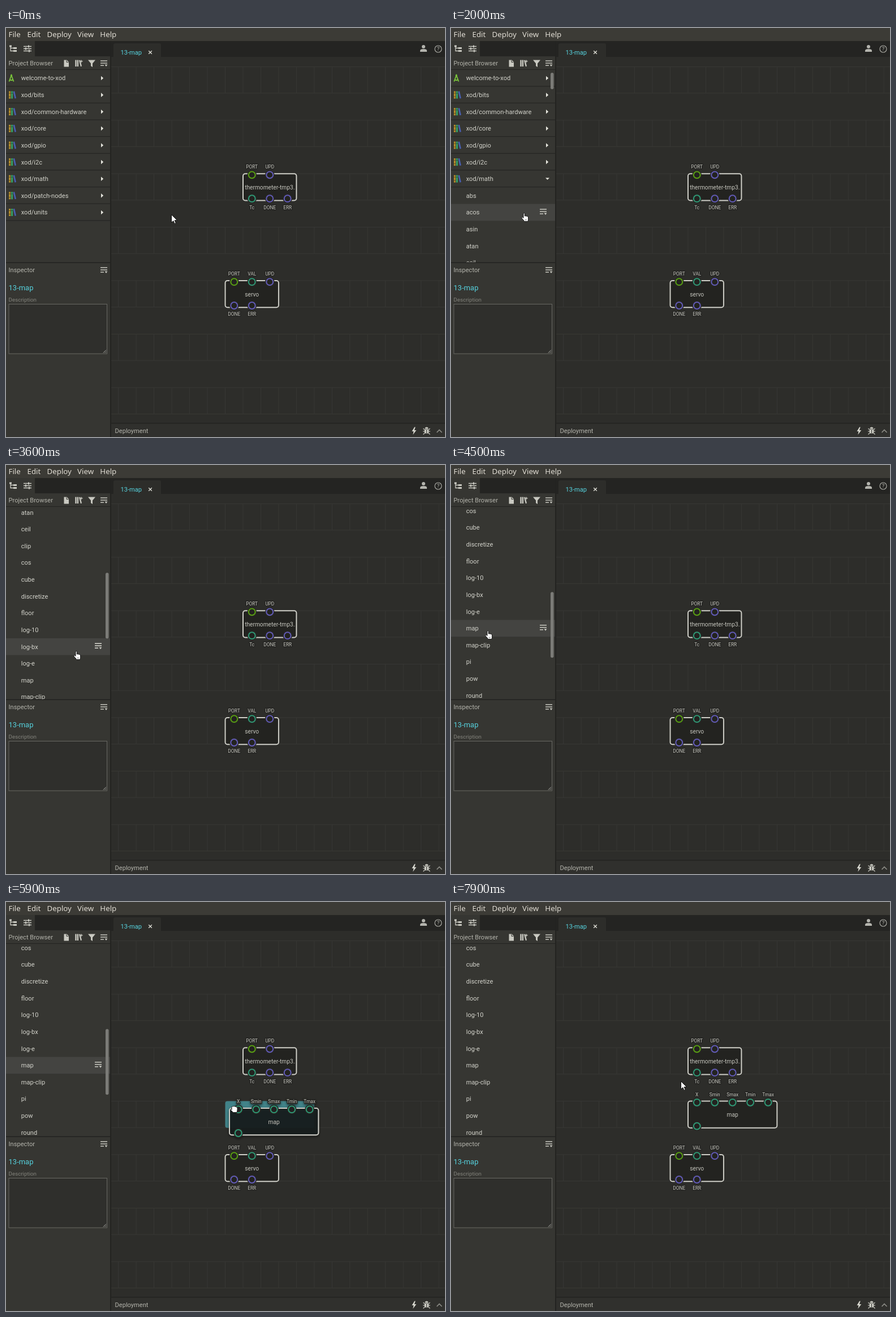
Recreate the animation shown at these times as an HTML page. Size 776 by 722 pixels, loop 8000 ms.

```html
<!DOCTYPE html>
<html lang="en">
<head>
<meta charset="utf-8">
<title>Patch editor</title>
<style>
  html, body { margin: 0; width: 100%; height: 100%; overflow: hidden; background: #2d2d2a; }
  svg { display: block; width: 776px; height: 722px; }
  text { font-family: Roboto, "Noto Sans", sans-serif; white-space: pre; }
  .menu { font-family: "Noto Sans", "Open Sans", sans-serif; }
  .pin { paint-order: stroke; stroke: #262624; stroke-width: 3.5px; stroke-linejoin: round; }
</style>
</head>
<body>
<svg id="stage" viewBox="0 0 776 722" xmlns="http://www.w3.org/2000/svg"></svg>
<script>
const LOOP = 8000, TICK = 100;
const ROW = 29.62, LIST_TOP = 73.7, LIST_END = 414;
const SLOT_X = 31.47, SLOT_Y = 94.4, GRID_X = 198.7, GRID_Y = 68.4, NODE_H = 47.2;
const C = {
  patch: '#2d2d2a', side: '#363632', dark: '#242422', line: '#252523', grid: '#383835',
  text: '#d2d2ca', dim: '#b4b4ac', icon: '#c9c9c1', cyan: '#56d3df', edge: '#cdcdc6',
  port: '#59a012', num: '#2f9a76', pulse: '#625bb8'
};

// ---- markup helpers ----
const rect = (x, y, w, h, fill, more = '') =>
  `<rect x="${x}" y="${y}" width="${w}" height="${h}" fill="${fill}" ${more}/>`;
const path = (d, fill, more = '') => `<path d="${d}" fill="${fill}" ${more}/>`;
const line = (d, color, w = 1, more = '') =>
  path(d, 'none', `stroke="${color}" stroke-width="${w}" ${more}`);
const circle = (x, y, r, fill, more = '') =>
  `<circle cx="${x}" cy="${y}" r="${r}" fill="${fill}" ${more}/>`;
const text = (x, mid, s, size = 11.1, fill = C.text, more = '') =>
  `<text x="${x}" y="${mid + size * 0.35}" font-size="${size}" fill="${fill}" ${more}>${s}</text>`;
const group = (body, more = '') => `<g ${more}>${body}</g>`;
const at = (x, y, body) => group(body, `transform="translate(${x} ${y})"`);

const listIcon = at(0, 0,
  line('M0 1H12M0 5H12M0 9H6', C.icon, 1.6) + path('M7.5 7.5h5l-2.5 3.5z', C.icon));

// ---- sidebar ----
const libs = ['welcome-to-xod', 'xod/bits', 'xod/common-hardware', 'xod/core', 'xod/gpio',
  'xod/i2c', 'xod/math', 'xod/patch-nodes', 'xod/units'];
const MATH = 6;
const patches = ['abs', 'acos', 'asin', 'atan', 'ceil', 'clip', 'cos', 'cube', 'discretize',
  'floor', 'log-10', 'log-bx', 'log-e', 'map', 'map-clip', 'pi', 'pow', 'round'];
const MAP_ROW = MATH + 1 + patches.indexOf('map');

const compass = line('M5.5 6L9.5-5L13.5 6M7 2.5Q9.5 5 12 2.5', '#78c13a', 1.9) +
  circle(9.5, -5, 1.6, '#78c13a');
const books = rect(5, -6.5, 3.2, 13, '#b08a2c') + rect(5, -3.5, 3.2, 1, '#5e4c22') +
  rect(5, 2.5, 3.2, 1, '#5e4c22') + rect(9, -6.5, 3.2, 13, '#369b62') +
  rect(9, -3.5, 3.2, 1, '#22583b') + path('M12.6-6L15.2-6.6L18 5.8L15.4 6.4z', '#4a5fb0');

function libRow(i, slot, open) {
  const mark = open ? 'M167-1.8h7l-3.5 3.6z' : 'M168-3.8l4.2 3.8l-4.2 3.8z';
  return at(0, LIST_TOP + (slot + 0.5) * ROW,
    line(`M0 ${ROW / 2 - 0.5}H184`, C.line, 1.2) + (i ? books : compass) +
    text(26.7, 0, libs[i]) + path(mark, '#e4e4dc'));
}
const closedRows = libs.map((_, i) => libRow(i, i, false)).join('');
const openRows = libs.slice(0, MATH + 1).map((_, i) => libRow(i, i, i === MATH)).join('') +
  patches.map((p, i) => text(26.7, LIST_TOP + (MATH + 1.5 + i) * ROW, p)).join('');

function sidebar() {
  return rect(0, 23, 184, 699, C.side) +
    rect(51, 23, 133, 27, C.dark) +
    line('M8 31.5V40.5H13M8 35.5H13', C.icon, 1.3) + rect(6, 30.5, 4, 3, C.icon) +
    rect(13, 34, 6, 3, C.icon) + rect(13, 39, 6, 3, C.icon) +
    line('M31 32.5H45M31 36.5H45M31 40.5H45', C.icon, 1.3) +
    rect(39, 30.5, 2, 4, C.icon) + rect(34, 34.5, 2, 4, C.icon) + rect(40, 38.5, 2, 4, C.icon) +
    text(4.6, 62.3, 'Project Browser', 11.1, C.dim) +
    path('M102.5 56.5h5l3.5 3.5v8.5h-8.5z', C.icon) + line('M107 56.8v3.6h3.6', C.side, 1) +
    rect(122.3, 56.5, 2.4, 11.5, C.icon) + rect(125.7, 56.5, 2.4, 11.5, C.icon) +
    path('M129 57l2.2-.5l2.8 11l-2.2.6z', C.icon) + line('M131 58.7h4.6M133.3 56.4v4.6', C.icon, 1.2) +
    path('M145 56.5h13l-5 6v6.5l-3-2v-4.5z', C.icon) +
    at(167, 57, listIcon) + line('M0 73.4H184', C.line, 1.2);
}

const inspectorHead = rect(0, 414, 184, 308, C.side) + line('M0 414.3H184', '#222220', 1.4) +
  text(4.6, 427.4, 'Inspector', 11.1, C.dim) + at(167, 422, listIcon);

const projectInfo = text(4.6, 458, '13-map', 12.96, C.cyan) +
  text(4.6, 479.5, 'Description', 9.75, '#83837c') +
  rect(5, 487.5, 173.5, 87.5, '#2f2f2c', 'stroke="#686863"') +
  line('M172 573.5l5-5M175 573.5l2-2', '#b5b5af', 1);

const mapPins = ['X', 'Smin', 'Smax', 'Tmin', 'Tmax'];
const nodeInfo = text(4.6, 458, 'map', 12.96, C.cyan) +
  mapPins.map((p, i) => {
    const y = 487 + i * 27;
    return circle(10.5, y, 4.5, C.dark, `stroke="${C.num}" stroke-width="1.6"`) +
      text(22, y, p, 10.2, C.dim) +
      rect(70.5, y - 10, 108, 20, '#2f2f2c', 'stroke="#5a5a55"') + text(76, y, '0', 10.2);
  }).join('') +
  text(4.6, 622, 'Label', 9.75, '#83837c') +
  rect(5, 630.5, 173.5, 20, '#2f2f2c', 'stroke="#686863"') +
  text(4.6, 663, 'Description', 9.75, '#83837c') +
  rect(5, 671.5, 173.5, 60, '#2f2f2c', 'stroke="#686863"');

// ---- patch ----
function grid() {
  let d = '';
  for (let y = GRID_Y; y < 697; y += SLOT_Y) {
    d += `M186 ${y}H776M186 ${y + 46.6}H776`;
    for (let x = GRID_X; x < 776; x += SLOT_X) d += `M${x} ${y}v46.6`;
  }
  return line(d, C.grid, 1);
}

// pins: [slot, label, colour]
function node(slots, title, ins, outs, { edge = C.edge, fill = '#232320', shift = null } = {}) {
  const w = slots * SLOT_X;
  const pin = (y, labelY) => ([s, label, color]) => {
    const x = (s + 0.5) * SLOT_X;
    return circle(x, y, 8.4, '#272724') +
      circle(x, y, 5.9, '#232320', `stroke="${color}" stroke-width="2"`) +
      text(x, labelY, label, 8.33, '#c4c4bc', 'text-anchor="middle" class="pin"');
  };
  const name = shift === null
    ? text(w / 2, 24, title, 10.18, '#c4c4bc', 'text-anchor="middle"')
    : group(text(shift, 24, title, 10.18, '#c4c4bc'), 'clip-path="url(#nodeClip)"');
  return rect(0, 0, w, NODE_H, fill, `rx="4" stroke="${edge}" stroke-width="2"`) + name +
    ins.map(pin(2.2, -12)).join('') + outs.map(pin(44, 59.5)).join('');
}
const mapNode = look => node(5, 'map', mapPins.map((p, i) => [i, p, C.num]), [[0, '', C.num]], look);
const slotAt = (i, j) => [GRID_X + i * SLOT_X, GRID_Y + j * SLOT_Y];

function patch() {
  return rect(186, 51, 590, 647, C.patch) + grid() +
    at(...slotAt(7, 2), node(3, 'thermometer-tmp3…',
      [[0, 'PORT', C.port], [1, 'UPD', C.pulse]],
      [[0, 'Tc', C.num], [1, 'DONE', C.pulse], [2, 'ERR', C.pulse]], { shift: 3.2 })) +
    at(...slotAt(6, 4), node(3, 'servo',
      [[0, 'PORT', C.port], [1, 'VAL', C.num], [2, 'UPD', C.pulse]],
      [[0, 'DONE', C.pulse], [1, 'ERR', C.pulse]]));
}

function chrome() {
  const menu = [[4.5, 'File'], [37.5, 'Edit'], [72.5, 'Deploy'], [126, 'View'], [166.3, 'Help']];
  return rect(0, 0, 776, 23, '#3c3b36') +
    menu.map(([x, s]) => text(x, 11.2, s, 13.3, '#dfdbd2', 'class="menu"')).join('') +
    rect(184, 23, 2, 699, '#232321') + rect(186, 23, 590, 28, C.dark) +
    path('M190 51V30q0-3 3-3h78q3 0 3 3V51z', C.patch) +
    text(202.5, 43, '13-map', 11.1, C.cyan) +
    line('M252.2 40.2l5.6 5.6M257.8 40.2l-5.6 5.6', '#dcdcd4', 1.4) +
    circle(738, 33, 3, '#b4b4ae') + path('M732 42v-2q0-3 6-3t6 3v2z', '#b4b4ae') +
    circle(764, 37, 6, 'none', 'stroke="#a6a6a0" stroke-width="1.2"') +
    text(764, 37, '?', 9.5, '#b4b4ae', 'text-anchor="middle"') +
    rect(186, 697, 590, 25, '#30302d') + rect(186, 697, 590, 1.4, '#222220') +
    text(192.5, 711.6, 'Deployment', 11.1, C.dim) +
    path('M722 704.5l-4.5 7.5h3l-1.2 6l6-8h-3.4l1.8-5.5z', '#d6d6ce') +
    circle(743.5, 712, 4, C.icon) + path('M740.5 707.5a3 3 0 0 1 6 0z', C.icon) +
    line('M737.5 707l3 2.5M749.5 707l-3 2.5M737 712h13M737.5 717.5l3-3M749.5 717.5l-3-3', C.icon, 1.2) +
    line('M743.5 709v7', '#30302d', 1) +
    line('M761.5 714l4.5-4.5l4.5 4.5', '#8d8d87', 1.6);
}

// ---- pointers ----
const outline = 'stroke="#151515" stroke-width="1" stroke-linejoin="round"';
const pointers = {
  arrow: path('M.5.5V14.5L3.8 11.4L6 16.4L8.3 15.4L6.1 10.6H10.6z', '#fff', outline),
  hand: path('M4 8V2Q4 .5 5.2.5T6.4 2V6Q7.8 5.2 8.6 6.2Q10 5.4 10.8 6.6Q12.6 6.2 12.6 8V11.5' +
    'Q12.6 13 11.8 15.5H5.6Q4.6 13 1.2 10Q.3 8.6 1.6 8T4 9.4z', '#fff', outline) +
    line('M7.3 11.5v2.4M9.2 11.5v2.4', '#555', 0.7),
  grab: path('M3 7V3Q3 1.6 4.4 1.6Q5.2.6 6.6 1.4Q7.8.5 9 1.6Q10.6 1 11.2 2.6Q13 2.4 13 4.2V7' +
    'Q13 9.5 12 12H5Q4 9.6 1.4 8Q.4 6.6 1.6 5.8T3 7z', '#fff', outline)
};

document.getElementById('stage').innerHTML =
  `<defs>
    <clipPath id="list"><rect x="0" y="${LIST_TOP}" width="184" height="${LIST_END - LIST_TOP}"/></clipPath>
    <clipPath id="canvas"><rect x="186" y="51" width="590" height="646"/></clipPath>
    <clipPath id="nodeClip"><rect x="2" y="12" width="90" height="24"/></clipPath>
    <filter id="shade" x="-10%" y="-20%" width="120%" height="150%">
      <feDropShadow dx="0" dy="2" stdDeviation="2.2" flood-color="#000" flood-opacity=".55"/></filter>
  </defs>` +
  patch() +
  group(
    at(...slotAt(7, 3), group(mapNode(), 'id="placed"') +
      group(mapNode({ edge: C.cyan }), 'id="selected"')) +
    group(rect(0, 0, 5 * SLOT_X, NODE_H, '#418389', 'rx="4"'), 'id="ghost"') +
    group(group(mapNode({ fill: 'rgba(25,29,30,.93)' }), 'filter="url(#shade)"'), 'id="drag"'),
    'clip-path="url(#canvas)"') +
  sidebar() +
  group(
    rect(0, 0, 184, ROW, '#444441', 'id="hover"') +
    group(group(closedRows, 'id="closed"') + group(openRows, 'id="open"'), 'id="rows"') +
    group(listIcon, 'id="rowMenu"') +
    rect(176, 79, 5.5, 29, '#7b7b77', 'id="thumb" rx="2.7"'),
    'clip-path="url(#list)"') +
  inspectorHead + group(projectInfo, 'id="project"') + group(nodeInfo, 'id="nodeInfo"') +
  chrome() +
  Object.entries(pointers).map(([k, body]) => group(body, `id="${k}"`)).join('');

// ---- motion: [time, values...] ----
const pointerPath = [[0, 292, 329], [300, 292, 329], [400, 283, 306], [500, 283, 306],
  [1100, 143, 265], [1600, 143, 265], [1700, 142.5, 278], [1800, 142.5, 278], [1900, 134, 302],
  [2000, 124, 326], [2500, 124, 326], [3400, 120, 328], [3600, 119, 328], [3900, 112, 324],
  [4400, 66, 296], [4500, 60, 292], [4600, 60, 292], [4700, 31, 289], [5000, 31, 289],
  [5100, 76, 296], [5200, 178, 318], [5300, 267, 334], [5600, 350, 350], [5900, 396, 359.5],
  [6300, 412, 357], [6700, 418, 353.5], [7100, 418, 353.5], [7400, 371, 360], [7500, 371, 360],
  [7900, 406, 316]];
const dragPath = [[5200, 181, 321], [5300, 269, 336], [5600, 350, 353], [5900, 395, 364],
  [6300, 414, 359], [6700, 422, 355]];
const scrollPath = [[2100, 0], [2300, 42], [2500, 42], [3000, 190], [3400, 294], [3500, 294],
  [3600, 301], [4200, 388], [4400, 392.6]];

function sample(keys, t) {
  if (t <= keys[0][0]) return keys[0].slice(1);
  for (let i = 1; i < keys.length; i++) {
    const a = keys[i - 1], b = keys[i];
    if (t <= b[0]) {
      const k = (t - a[0]) / (b[0] - a[0]);
      return a.slice(1).map((v, j) => v + (b[j + 1] - v) * k);
    }
  }
  return keys[keys.length - 1].slice(1);
}

const $ = id => document.getElementById(id);
const show = (id, on) => { $(id).style.display = on ? '' : 'none'; };
const move = (id, x, y) => $(id).setAttribute('transform', `translate(${x} ${y})`);

function draw(t) {
  const [px, py] = sample(pointerPath, t);
  const [scroll] = sample(scrollPath, t);
  const held = t >= 4900 && t < 6700;
  const dropped = t >= 7000, picked = dropped && t < 7600;
  const inList = px < 184 && t < 5100;

  const kind = held ? 'grab' : (inList || (t >= 6700 && t < 7200)) ? 'hand' : 'arrow';
  for (const k in pointers) show(k, k === kind);
  move(kind, px, py);

  const open = t >= 1400;
  show('closed', !open);
  show('open', open);
  move('rows', 0, -scroll);

  const row = t >= 5000 ? MAP_ROW : Math.floor((py + 1 - LIST_TOP + scroll) / ROW);
  const hovered = inList || (t >= 5000 && !dropped);
  const rowY = LIST_TOP + row * ROW - scroll;
  show('hover', hovered);
  show('rowMenu', hovered && open && row > MATH);
  $('hover').setAttribute('y', rowY);
  move('rowMenu', 157, rowY + 8.3);

  show('thumb', hovered);
  $('thumb').setAttribute('y', 79 + scroll * 0.37);
  $('thumb').setAttribute('height', t < 2200 ? 29 : 116);

  const dragging = t >= 5200 && !dropped;
  const [nx, ny] = sample(dragPath, t);
  show('drag', dragging);
  show('ghost', dragging);
  move('drag', nx, ny);
  move('ghost', ...slotAt(Math.round((nx - GRID_X) / SLOT_X), Math.round((ny - GRID_Y) / SLOT_Y)));
  show('placed', dropped && !picked);
  show('selected', picked);
  show('project', !picked);
  show('nodeInfo', picked);
}

const start = performance.now();
function loop(now) {
  const t = Math.max(0, now - start) % LOOP;
  draw(Math.floor(t / TICK) * TICK);
  requestAnimationFrame(loop);
}
draw(0);
requestAnimationFrame(loop);
</script>
</body>
</html>
```
